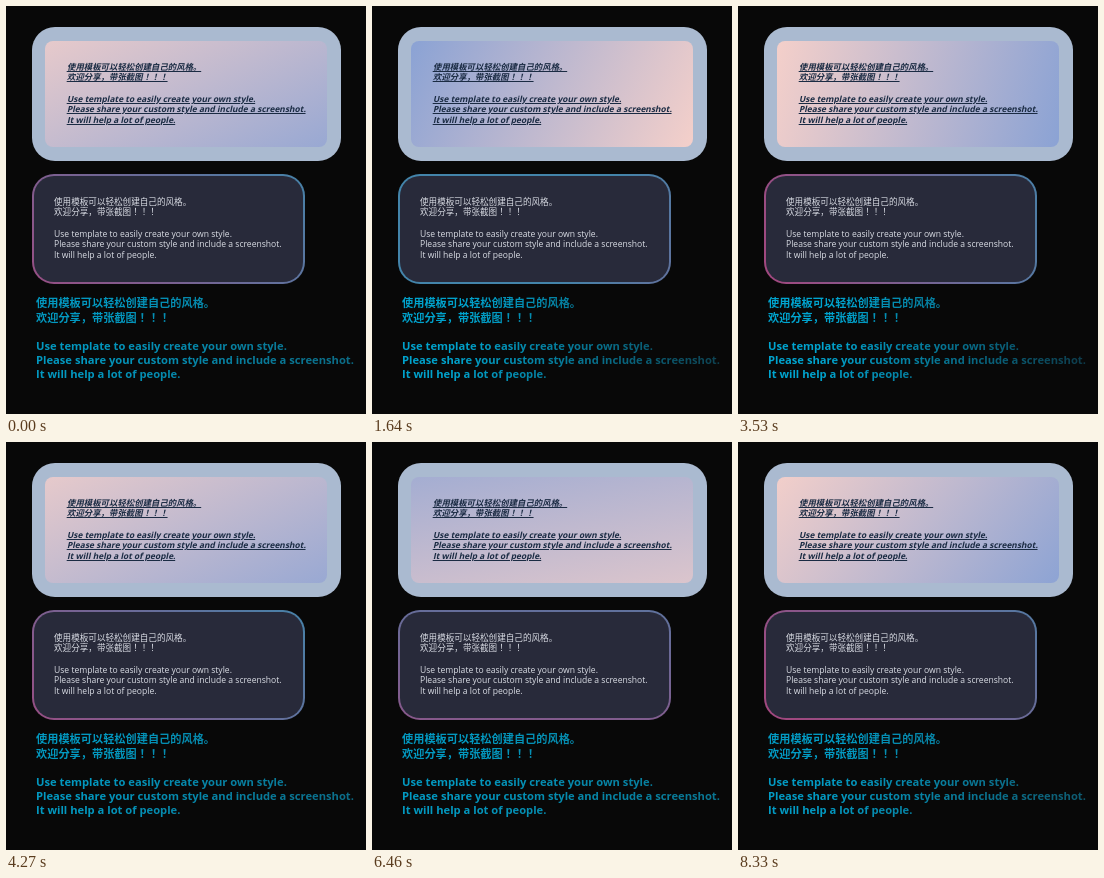
These frames come from a looping animation (360x408 px, 8520 ms). An HTML page:

```html
<!DOCTYPE html>
<html lang="en">
<head>
<meta charset="utf-8">
<title>Animated text styles</title>
<style>
@property --turn { syntax: "<angle>"; inherits: false; initial-value: 153deg; }
@property --aim { syntax: "<angle>"; inherits: false; initial-value: 45deg; }
@property --shift { syntax: "<length>"; inherits: false; initial-value: 0px; }
@property --near { syntax: "<color>"; inherits: false; initial-value: #0298c0; }
@property --far { syntax: "<color>"; inherits: false; initial-value: #0c6a84; }

html, body {
  margin: 0;
  width: 100%;
  height: 100%;
  overflow: hidden;
  background: #080808;
}

.panel, .text { position: absolute; box-sizing: border-box; }

.text {
  font-family: "Open Sans", "Noto Sans CJK JP", "Noto Sans CJK", sans-serif;
  white-space: pre;
}
.text span { display: block; height: 1lh; }

.frame {
  left: 25.6px; top: 20.7px; width: 309.4px; height: 134.3px;
  border-radius: 23px;
  background: #aabad0;
}
.pastel {
  left: 39.3px; top: 35px; width: 281.7px; height: 106px;
  border-radius: 8px;
  background: linear-gradient(var(--turn),
    #f3cfca calc(50% - 146px), #8ca3d4 calc(50% + 146px));
  animation: turn 4260ms linear infinite;
}
.slanted {
  left: 61px; top: 55.7px;
  font-size: 8.42px; line-height: 10.65px; font-weight: 700;
  color: #1a2b43;
}
.slanted span {
  width: max-content;
  transform: skewX(-12deg);
  transform-origin: 0 75%;
  text-decoration: underline;
  text-decoration-thickness: 1px;
}

.outlined {
  left: 25.6px; top: 167.7px; width: 273.6px; height: 110.2px;
  border: 2px solid transparent;
  border-radius: 22px;
  background:
    linear-gradient(#282a3a, #282a3a) padding-box,
    linear-gradient(var(--aim),
      #a0487f calc(50% + var(--shift) - 155px),
      #4384aa calc(50% + var(--shift) + 155px)) border-box;
  animation: border-sweep 4260ms linear infinite;
}
.plain {
  left: 48px; top: 190.7px;
  font-size: 8.58px; line-height: 10.63px;
  color: #dadde5;
}

.glow {
  left: 30px; top: 290.4px; width: 320px;
  font-size: 11.2px; line-height: 14.2px; font-weight: 700;
  color: transparent;
  background: linear-gradient(105deg, var(--near) 20%, var(--far));
  -webkit-background-clip: text;
  background-clip: text;
  animation: glow 2130ms linear infinite;
}

@keyframes turn {
  0% { --turn: 153deg; }
  31% { --turn: 272deg; }
  38.5% { --turn: 296deg; }
  59.6% { --turn: 382deg; }
  73.5% { --turn: 446deg; }
  95.5% { --turn: 488deg; }
  100% { --turn: 513deg; }
}
@keyframes border-sweep {
  0%, 100% { --aim: 45deg; --shift: -10px; }
  31% { --aim: -75deg; --shift: 0px; }
  38.5% { --aim: -60deg; --shift: -200px; }
  59.6% { --aim: 45deg; --shift: 130px; }
  73.5% { --aim: 85deg; --shift: 0px; }
  95.5% { --aim: 50deg; --shift: 40px; }
}
@keyframes glow {
  0%, 100% { --near: #0298c0; --far: #0c6a84; }
  19% { --near: #009fc8; --far: #00a1cb; }
  47% { --near: #00a3ce; --far: #0d4252; }
  62% { --near: #00a5d0; --far: #0e3644; }
  77% { --near: #00a2cc; --far: #0e3f4e; }
  91% { --near: #029bc4; --far: #0f586d; }
}
</style>
</head>
<body>
<div class="panel frame"></div>
<div class="panel pastel"></div>
<div class="text slanted"></div>
<div class="panel outlined"></div>
<div class="text plain"></div>
<div class="text glow"></div>
<script>
const lines = [
  "使用模板可以轻松创建自己的风格。",
  "欢迎分享，带张截图！！！",
  "",
  "Use template to easily create your own style.",
  "Please share your custom style and include a screenshot.",
  "It will help a lot of people."
];
const slanted = document.querySelector(".slanted");
for (const line of lines) {
  const row = document.createElement("span");
  row.textContent = line;
  slanted.append(row);
}
for (const block of document.querySelectorAll(".plain, .glow")) {
  block.textContent = lines.join("\n");
}
</script>
</body>
</html>
```
